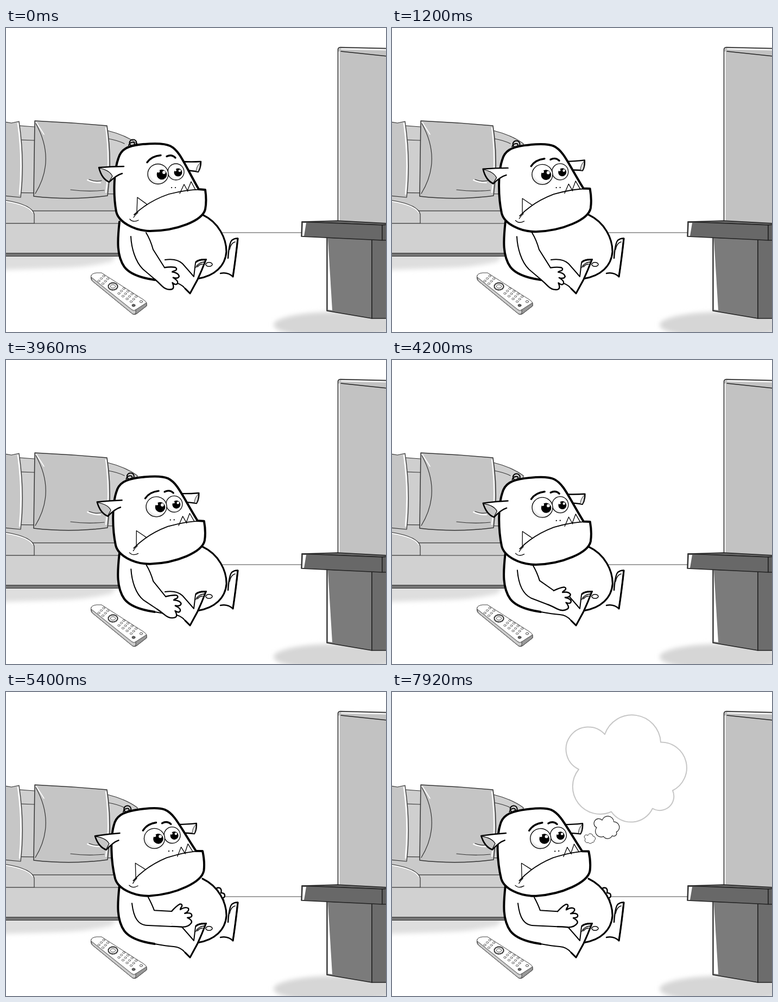
Recreate the animation shown at these times as an HTML page. Size 700 by 560 pixels, loop 8 s.

```html
<!DOCTYPE html>
<html>
<head>
<meta charset="utf-8">
<style>
html, body { margin: 0; width: 100%; height: 100%; overflow: hidden; background: #fff; }
svg { display: block; width: 700px; height: 560px; }
</style>
</head>
<body>
<svg viewBox="0 0 700 560" fill="none" stroke="#000" stroke-linecap="round" stroke-linejoin="round">
  <defs>
    <filter id="soft" x="-20%" y="-80%" width="140%" height="260%"><feGaussianBlur stdDeviation="4"/></filter>
    <radialGradient id="ball" cx=".58" cy=".4" r=".65">
      <stop offset=".7" stop-color="#fff"/><stop offset="1" stop-color="#d4d4d4"/>
    </radialGradient>
    <clipPath id="clipL"><ellipse cx="280" cy="269" rx="19" ry="18.5"/></clipPath>
    <clipPath id="clipR"><circle cx="313" cy="265" r="15"/></clipPath>
    <path id="cloud" vector-effect="non-scaling-stroke" d="M392 77.500A53 53 0 0 1 495 92A47 47 0 0 1 517 181A26 26 0 0 1 480 214A44 44 0 0 1 404 220A50.600 50.600 0 0 1 344 142A41 41 0 1 1 392 77.500Z"/>
  </defs>

  <!-- room -->
  <path d="M365 377H546" stroke="#444" stroke-width="1.2"/>
  <g stroke="none" filter="url(#soft)">
    <path d="M-20 416H205L195 430Q150 441 100 442L-20 446Z" fill="#dedede"/>
    <ellipse cx="610" cy="547" rx="117" ry="24" fill="#d6d6d6"/>
  </g>

  <!-- sofa -->
  <g stroke="#333" stroke-width="1.2">
    <path d="M-3 178L52 182L187 189Q220 197 242 213L230 320H-3Z" fill="#cfcfcf"/>
    <path d="M-3 205L52 207M189 204Q206 207 218 213"/>
    <path d="M-3 303L220 306V337H-3Z" fill="#cacaca"/>
    <path d="M-3 337H220V361H-3Z" fill="#cfcfcf"/>
    <path d="M-3 317Q48 325 52 343V360H-3Z" fill="#cfcfcf"/>
    <path d="M-3 319Q42 326 49 340" stroke="#fff" stroke-width="1.5"/>
    <path d="M-3 360H220V415H-3Z" fill="#d1d1d1"/>
    <path d="M-3 415H220V420.5H-3Z" fill="#777"/>
    <path d="M-3 173L10 175L24 172Q35 245 27 312L-3 309Z" fill="#c6c6c6"/>
    <path d="M22 176Q31 240 25 306" stroke="#fff" stroke-width="2.5"/>
    <path d="M53 171Q120 174 186 180Q196 245 187 309Q120 318 51 310Z" fill="#c5c5c5" stroke-width="1.5"/>
    <path d="M184 184Q192 245 184 303" stroke="#fff" stroke-width="2"/>
    <path d="M55 176Q92 243 54 305"/>
    <path d="M56 174L70 196" stroke="#fff" stroke-width="1.5"/>
    <path d="M119 298Q150 302 181 299M153 279Q165 284 176 281"/>
    <path d="M150 280Q160 285 174 285" stroke="#fff" stroke-width="2"/>
  </g>

  <!-- television and stand -->
  <g stroke="#222" stroke-width="1.5">
    <path d="M611.5 358V41Q611 35.500 616 35.500L703 37.500V362Z" fill="#c2c2c2"/>
    <path d="M613.500 355V44M618 38.500L703 40.500" stroke="#fff" stroke-width="1.8"/>
    <path d="M617 43L703 52"/>
    <path d="M591 386L674 389V535L591 521Z" fill="#7b7b7b"/>
    <path d="M674 389H703V535H674Z" fill="#6c6c6c"/>
    <path d="M593 388L601 520L593 519Z" fill="#fff" stroke="none"/>
    <path d="M545 357L611 355L703 360V364L693 363Z" fill="#666"/>
    <path d="M545 357L693 363V391L544 384Z" fill="#686868"/>
    <path d="M693 363L703 362V391H693Z" fill="#606060"/>
    <path d="M547 359H553L549 383H546Z" fill="#fff" stroke="none"/>
  </g>

  <!-- remote control -->
  <g stroke="#444" stroke-width="1">
    <path d="M157 456Q158 452 167 451L176 451L254 501Q259 504 259 508V512L241 526Q236 530 231 525L159 466Q155 462 157 456Z" fill="#fff"/>
    <path d="M239 519L259 506V512L241 526Q238 528 236 527Z" fill="#999"/>
    <path d="M157 459L232 519Q236 522 239 519V526Q235 529 231 525L159 466Z" fill="#ccc"/>
    <ellipse cx="197" cy="476" rx="8.500" ry="6.500" stroke-width="2.4" stroke-dasharray="2 2"/>
    <ellipse cx="197" cy="476" rx="4.500" ry="3.200"/>
    <ellipse cx="235" cy="511" rx="3" ry="2.2" fill="#666"/>
    <ellipse cx="249" cy="504" rx="2.600" ry="2"/>
    <g id="buttons" stroke-width=".8"></g>
  </g>

  <!-- body -->
  <path id="farHand" d="M386 365Q388 359 394 361Q398 364 396 370Q403 370 403 375Q403 379 398 380Q404 384 399 388" fill="#fff" stroke-width="2.4"/>
  <g fill="#fff">
    <g id="belly">
      <path d="M209 357C205 393 204 420 218 440C229 455 258 463 295 467L352 462C385 457 404 438 406 412C406 388 392 358 365 345Z" stroke="none"/>
      <path d="M209 357C205 393 204 420 218 440C227 452 246 460 274 464" fill="none" stroke-width="4"/>
      <path d="M352 462C385 457 404 438 406 412C406 388 392 358 362 344" fill="none" stroke-width="3.2"/>
    </g>
    <ellipse cx="374" cy="435.500" rx="6" ry="3.8" stroke-width="1.5"/>
    <path d="M409 424Q411 396 416 391Q421 387 427 387.5Q423 425 418 458Q408 449 395 452" stroke-width="2.4"/>
    <path d="M427 388Q423 425 418 458" stroke-width="3.2"/>
    <path d="M412 408Q414 396 422 394" stroke-width="1.5"/>
    <path d="M274 464Q295 468 309 469Q322 470 330 480L339 489L352 466Q360 447 369 426Q351 426 349 433L346 458Q334 444 325 434Q314 424 293 427" stroke-width="2"/>
    <path d="M330 480L339 489L353 463Q361 446 368 427Q356 426 350 431" stroke-width="3" fill="none"/>
    <path d="M350 441Q354 432 365 431M353 440Q356 435 362 435" stroke-width="1.5" fill="none"/>
    <g id="arm">
      <path id="armFill" stroke="none"/>
      <path id="armLine" stroke-width="2" fill="none"/>
      <path id="hand" stroke-width="2.4" d="M0 -14Q8 -23 15 -27Q20 -28 19 -23Q16 -19 16 -17Q26 -23 31 -19Q33 -14 24 -10Q36 -12 37 -7Q38 -2 29 -2Q39 3 36 8Q30 16 18 15Q8 14 0 14"/>
    </g>
  </g>

  <!-- head -->
  <g id="head" fill="#fff">
    <g id="earR">
      <path d="M322 246Q342 247 359 246Q359 258 354 265Q344 263 330 262" stroke-width="2.4"/>
      <path d="M358 248Q351 254 350 264L354 264.500Q358 258 358 248Z" fill="#ddd" stroke-width=".8"/>
    </g>
    <g fill="none" stroke-width="2">
      <ellipse cx="234" cy="211.5" rx="6.5" ry="6"/>
      <path d="M226 216Q229 209 236 211Q239 215 233 216M232 217L243 215"/>
    </g>
    <path d="M207 240C212 223 225 217 248 214.5C273 212 292 212 303 217.500C321 227 328 250 355 297L367 298Q370 318 367 334C362 355 314 374 265 374C235 373 207 357 203 338C197 305 199 262 207 240Z" stroke-width="4"/>
    <g id="earL">
      <path d="M217 255Q195 255 171 257Q176 278 190 284Q203 271 214 268" stroke-width="2.4"/>
      <path d="M172 258Q191 262 196 273L190 283Q177 277 172 258Z" fill="#c6c6c6" stroke-width="1.2"/>
    </g>
    <path d="M241 340L242 312L260 325M320 305L328 288L335 301M334 300L341 283L349 298" stroke-width="1.3"/>
    <path d="M236 344Q262 319 300 306Q340 296 367 298" fill="none" stroke-width="1.8"/>
    <path d="M228 352Q234 359 244 354M235 349Q238 344 243 340" fill="none" stroke-width="1.3"/>
    <path d="M305 294h.1M312 294h.1" stroke-width="2.2"/>
    <g id="brows" fill="none" stroke-width="3.4">
      <path d="M260 247.5Q268 236 285 234.5"/><path d="M296 236.5Q305 232 312 239"/>
    </g>
    <g id="eyes" stroke="none">
      <circle cx="313" cy="265" r="15" fill="url(#ball)"/>
      <g clip-path="url(#clipR)">
        <circle cx="317" cy="266" r="7.5" fill="#000"/>
        <circle cx="320" cy="263" r="2.3"/><circle cx="312" cy="262" r="2"/>
        <rect class="lid" x="297" y="249" width="32" height="32"/>
      </g>
      <circle class="rim" cx="313" cy="265" r="15" fill="none" stroke="#000"/>
      <ellipse cx="280" cy="269" rx="19" ry="18.5" fill="url(#ball)"/>
      <g clip-path="url(#clipL)">
        <circle cx="287" cy="270" r="9.3" fill="#000"/>
        <circle cx="291" cy="266" r="2.9"/><circle cx="281" cy="264" r="2.4"/>
        <rect class="lid" x="260" y="250" width="40" height="38"/>
      </g>
      <ellipse class="rim" cx="280" cy="269" rx="19" ry="18.5" fill="none" stroke="#000"/>
    </g>
  </g>

  <!-- thought bubbles -->
  <g fill="#fff">
    <use id="puff1" href="#cloud" stroke="#333" stroke-width="1" transform="translate(364.5 270) scale(.092) translate(-433 -140)"/>
    <use id="puff2" href="#cloud" stroke="#222" stroke-width="1.2" transform="translate(395.7 249.3) scale(.21) translate(-433 -140)"/>
    <use id="puff3" href="#cloud" stroke-width="2" transform="translate(0 .5)"/>
  </g>
</svg>

<script>
const $ = id => document.getElementById(id);
const set = (id, name, value) => $(id).setAttribute(name, value);
const LOOP = 8000, STEP = 120;

// Rows of small remote keys: start, count along, count across.
function keys(x, y, along, across) {
  let out = "";
  for (let i = 0; i < along; i++) for (let j = 0; j < across; j++)
    out += `<ellipse cx="${x + i * 7.5 + j * 4.5}" cy="${y + i * 5 - j * 4.5}" rx="2.2" ry="1.7"/>`;
  return out;
}
$("buttons").innerHTML = keys(171, 466, 2, 3) + keys(208, 489, 4, 3);

// Piecewise linear track of [time, value] pairs.
function track(t, points) {
  let [t0, v0] = points[0];
  for (const [t1, v1] of points) {
    if (t < t1) return t <= t0 ? v0 : v0 + (v1 - v0) * (t - t0) / (t1 - t0);
    [t0, v0] = [t1, v1];
  }
  return v0;
}

const tilt = [[600, 0], [720, .1], [1200, 1.8], [1440, 2], [2040, 1.7], [4200, 1.7], [4800, 3.6], [5160, 3.9], [5640, 3.6]];
const dip = [[360, 0], [480, .6], [720, 2.4], [960, 2.4], [1320, 0], [1680, 1], [2040, .6],
             [3840, .6], [4200, 2.6], [4440, 3.2], [4800, 2.4], [5160, .2], [5520, .8]];
const brow = [[360, 0], [480, 1], [720, 6], [1080, 5.5]];
const lid = [[480, 0], [720, 1], [840, 1], [1080, 0]];
const raise = [[3840, 0], [4200, .45], [4800, .93], [5160, 1.03], [5520, 1]];
const ear = [[480, 0], [840, -2], [1200, 2], [1680, -1], [2160, 0], [3960, 0], [4440, -2], [4920, 2], [5520, -1], [6240, 0]];
const reach = [[4320, 0], [4800, .6], [5280, 1]];
const fades = [[[6720, 0], [6840, .15], [7560, 1]], [[7080, 0], [7680, 1]], [[7560, 0], [7920, .22]]];

function drawArm(k, drop) {
  const mix = (a, b) => a + (b - a) * k;
  const at = (ax, ay, bx, by) => mix(ax, bx) + " " + mix(ay, by);
  const hx = mix(283, 305), hy = mix(452, 418), angle = 40 * (1 - k);
  const s = 14 * Math.sin(angle * Math.PI / 180), c = 14 * Math.cos(angle * Math.PI / 180);
  const outer = `M${at(230, 384, 232, 389)}C${at(231, 405, 235, 415)} ${at(238, 430, 243, 430)} ${at(252, 444, 262, 430)}L${hx - s} ${hy + c}`;
  const shoulder = at(258, 377, 262, 378), bend = at(266, 390, 269, 391), elbow = at(271, 408, 273, 402);
  const wrist = `${hx + s} ${hy - c}`;
  set("armFill", "d", `${outer}L${wrist}L${elbow}Q${bend} ${shoulder}Z`);
  set("armLine", "d", `${outer}M${shoulder}Q${bend} ${elbow}L${wrist}`);
  set("hand", "transform", `translate(${hx} ${hy}) rotate(${angle})`);
  set("arm", "transform", `translate(0 ${drop})`);
}

function draw(t) {
  const d = track(t, dip), twitch = track(t, ear), shut = track(t, lid), r = track(t, reach);
  set("head", "transform", `translate(0 ${d}) rotate(${-track(t, tilt)} 280 370)`);
  set("brows", "transform", `translate(0 ${track(t, brow)})`);
  set("earL", "transform", `rotate(${twitch} 215 260)`);
  set("earR", "transform", `rotate(${-twitch} 330 253)`);
  set("belly", "transform", `translate(300 465) scale(${1 + d * .0015} 1) translate(-300 -465)`);
  document.querySelectorAll(".lid").forEach(e => e.style.transform = `translateY(${(shut - 1) * 40}px)`);
  document.querySelectorAll(".rim").forEach(e => e.setAttribute("stroke-width", 1.3 - .7 * shut));
  drawArm(track(t, raise), d * .4);
  set("farHand", "transform", `translate(${(r - 1) * 12} ${(1 - r) * 5})`);
  fades.forEach((f, i) => set("puff" + (i + 1), "opacity", track(t, f)));
}

function frame() {
  const t = performance.now() % LOOP;
  draw(Math.floor(t / STEP) * STEP);
  requestAnimationFrame(frame);
}
frame();
</script>
</body>
</html>
```
